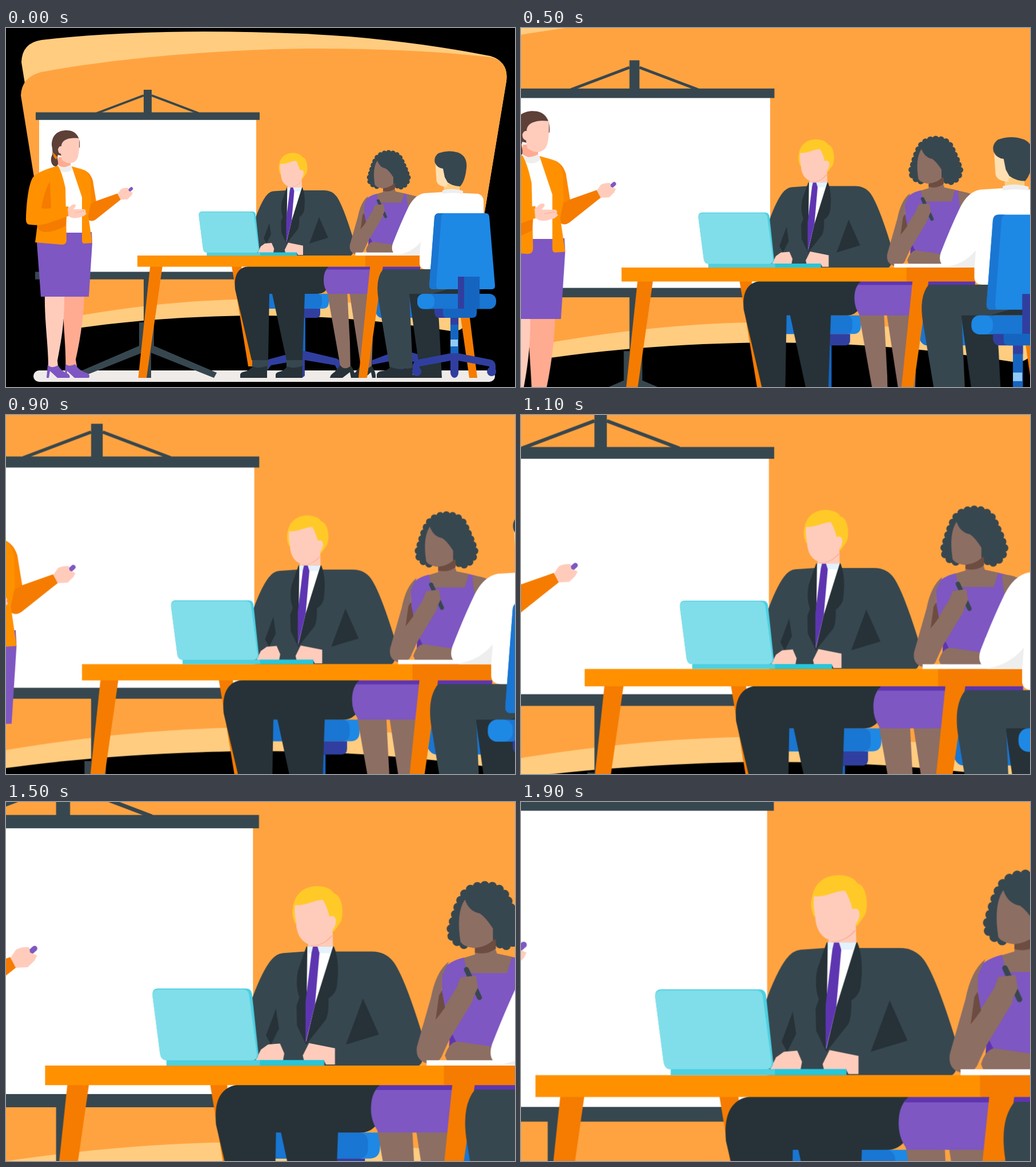
Write an HTML page that moves like this. It is 891 px wide and 628 px high and loops after 2 s.

```html
<!DOCTYPE html>
<html lang="en">
<head>
<meta charset="utf-8">
<title>Team presentation</title>
<style>
  html, body { margin: 0; width: 100%; height: 100%; overflow: hidden; background: #000; }
  svg { display: block; width: 100vw; height: 100vh; }
  #scene { transform-origin: 445.5px 314px; animation: zoom 2s steps(20, end) infinite; }
  @keyframes zoom { from { transform: scale(1); } to { transform: scale(2); } }

  .sand { fill: #ffcc80; } .amber { fill: #ffa340; }
  .slate { fill: #37474f; } .ink { fill: #263238; }
  .white { fill: #fff; } .grey { fill: #eeeeee; }
  .orange { fill: #ff9100; } .rust { fill: #f57c00; }
  .violet { fill: #7e57c2; } .grape { fill: #5e35b1; }
  .peach { fill: #ffccbc; } .coral { fill: #ffab91; }
  .brown { fill: #8d6e63; } .umber { fill: #6d4c41; }
  .cream { fill: #ffe0b2; }
  .sky { fill: #1e88e5; } .blue { fill: #1976d2; } .deep { fill: #1565c0; } .navy { fill: #303f9f; }
</style>
</head>
<body>
<svg viewBox="0 0 891 628" preserveAspectRatio="none">
<g id="scene">

  <g id="backdrop">
    <path class="sand" d="M27 60Q28 26 62 21C210 4 365 4 520 10C640 15 750 30 848 49Q880 59 876 93L806 513Q801 532 778 530C650 510 540 502 420 503C310 505 220 512 133 524Q104 525 99 505Z"/>
    <path class="amber" d="M26 118Q27 86 62 77C180 55 350 38 530 36C650 36 750 40 848 51Q880 59 876 91L810 492Q805 505 790 503C680 481 540 475 400 475C290 478 200 491 105 507Q90 507 86 490Z"/>
    <rect x="48" y="599" width="808" height="20" rx="10" fill="#efebe9"/>
  </g>

  <g id="screen" class="slate">
    <path d="M241 118L159 149M255 118L337 149" fill="none" stroke="#37474f" stroke-width="4"/>
    <rect x="241" y="108" width="14" height="42"/>
    <rect x="241" y="430" width="13" height="182"/>
    <path d="M233 515H259V556L369 603L364 612L246 565L128 612L124 603L233 556Z"/>
    <rect class="white" x="58" y="155" width="380" height="274"/>
    <rect x="52" y="147.500" width="392" height="13.300"/>
    <rect x="51" y="426.500" width="393" height="13.200"/>
  </g>

  <g id="presenter">
    <path class="coral" d="M100 465H137C136 505 130 545 122 580L125 598H104C106 560 99 520 100 465Z"/>
    <path class="peach" d="M68 465H102C103 515 96 550 90 582L92 600H74C75 560 67 515 68 465Z"/>
    <path class="violet" d="M104 587Q109 594 121 588Q128 600 143 604Q148 608 145 612H120L107 600L106 612H103Z"/>
    <path class="violet" d="M73 589Q80 597 91 590Q97 601 109 605Q113 609 111 612H90L77 600L75 612H71Z"/>
    <path class="violet" d="M56 357H150L151 376L145 470H61L54 376Z"/>
    <path class="white" d="M88 244L117 243L134 290V358H105Z"/>
    <path class="coral" d="M92 226H113V242Q101 248 89 238Z"/>
    <path class="grey" d="M87 240Q99 247 112 240L118 244Q113 253 102 252Q93 251 87 244Z"/>
    <path d="M80 205C80 187 91 179 106 179C123 179 131 192 129 209L99 224L91 222C88 230 95 238 88 242C80 243 77 231 80 224Q83 219 80 205Z" fill="#5d4037"/>
    <path class="rust" d="M82 217L90 226L88 230Q82 226 82 217Z"/>
    <path class="peach" d="M97 207C97 195 111 191 128 193Q129 214 126 225C122 239 108 239 98 231L96 220Q91 219 91 212Q93 206 97 207Z"/>
    <path d="M136 248Q148 253 152 267L158 304L151 337L143 330Z" fill="#fb8500"/>
    <path class="rust" d="M157 303L195 289.600L201 300L157 335Q150 340 143 335L147 309Z"/>
    <path class="orange" d="M115 242L133 247Q145 251 148 268L149 305L144 328L151 376L137 377Q133 377 133 371V296Z"/>
    <path class="orange" d="M91 241Q98 252 104 280L106 371Q106 379 98 379L51 375L55 344H42Q34 344 35 332C36 305 39 277 46 263Q53 251 91 241Z"/>
    <path class="rust" d="M77 268Q66 287 62 315L79 318Z"/>
    <path class="rust" d="M54 344L106 330L105 346Q82 358 66 357Q55 355 54 344Z"/>
    <path class="orange" d="M50 331L62 317L109 312L112 328L72 342Q55 346 43 344Z"/>
    <path class="peach" d="M108 316L116 309Q123 307 122 312L118 317L137 317Q141 319 139 322L141 325L136 329L126 332Q114 334 109 328Z"/>
    <path d="M122 323L137 320" stroke="#ffab91"/>
    <path d="M215 285L219.500 281" stroke="#7e57c2" stroke-width="5.500" stroke-linecap="round"/>
    <path class="peach" d="M195.500 290L201 282Q207 279 214 279.700L215 285L222 288L219.500 293L212.600 299.700L200.600 300.300Z"/>
  </g>

  <g id="rear-chairs">
    <path class="sky" d="M455 465H565V480Q565 491 554 491H455Z"/>
    <path class="blue" d="M455 465H543Q553 465 553 475V481Q553 491 543 491H455Z"/>
    <path class="navy" d="M519 491H550V500Q550 507 543 507H519Z"/>
    <rect class="deep" x="512" y="507" width="12" height="62"/>
    <path class="navy" d="M515 565H523L578 578Q586 580 586 590V598H580L576 590L523 581V608Q519 614 515 608V581L464 590L458 598H452V588Q452 582 462 579Z"/>
    <path class="blue" d="M645 465H740V507H658Q648 507 645 490Z"/>
    <path class="navy" d="M686 564H697L748 578V590L697 581V610H686V580L641 589V581Z"/>
  </g>

  <path id="rear-leg" class="rust" d="M395 416H412L434 592H424Z"/>

  <g id="suited-man">
    <path class="slate" d="M431 576H459V596H431ZM491 576H519V596H491Z"/>
    <path class="ink" d="M432 592Q443 597 457 591V612H410V606Q411 602 418 601Q426 599 432 592ZM492 592Q505 597 519 591V612H472V606Q473 602 480 601Q487 599 492 592Z"/>
    <path class="ink" d="M424 416H575L565 452Q558 465 546 465H523L519 581H491L466 465H461L459 581H430L401 457C399 436 404 419 424 417Z"/>
    <path class="slate" d="M468 285.500L490 284H557Q571 284 579 295Q590 311 607 366Q612 393 604 398H440L436 334Q446 306 455 294Q461 286 468 285.500Z"/>
    <path class="ink" d="M461 341L464 361L456 377L451 368ZM548 331L564 367L531 377Z"/>
    <path class="ink" d="M491.400 279H519Q525 294 522 318Q521 326 513.500 331Q514 345 511 352L491 377L482 358L481.500 338L484.500 330Q480 318 483 303Z"/>
    <path class="white" d="M492.400 279H518L500 337L491 375Z"/>
    <path fill="#e3f2fd" d="M492.400 279H518L515 285.500H493Z"/>
    <path class="grape" d="M498 279H502.500L504.500 285.500L500 337L490.500 376V335L496.500 285.500Z"/>
    <path d="M480 256Q476 246 478 240C480 225 490 218.500 503 218.500C512 219 517 222 519 226C528 228 529 247 526 254L519 264H510V245Z" fill="#ffca28"/>
    <path class="peach" d="M494 258H517.500L518 279H493Z"/>
    <path d="M496 278Q509 278 517 268" fill="none" stroke="#ffab91"/>
    <path class="peach" d="M480 237.500C490 239 500 232 508 232.500Q512 239 514.500 249Q521 247 521 254Q520 261 517 263C515 272 508 277 498 278Q482 275 481 255Q479 245 480 237.500Z"/>
  </g>

  <g id="dress-woman">
    <path class="brown" d="M561 455H597L602 550L603 596H586ZM600 455H645L640 598H622Z"/>
    <path class="ink" d="M585 590Q592 600 604 591Q612 602 610 612H604L602 602L589 612H567Q568 606 575 602ZM621 590Q630 600 640 591Q648 602 647 612H641L639 602L628 612H605Q606 606 612 602Z"/>
    <path class="violet" d="M566 417H725V465H564Q556 455 556 441Q556 424 566 417Z"/>
    <path class="grape" d="M565 417H725V422.400H561Z"/>
    <path class="brown" d="M660 281L660 287L640 293V312H710L730 309L719 295L696 289L682 286L680 280Z"/>
    <path class="violet" d="M627 303Q633 294 649 290L652 305.500H692L697 289.500L719 295L710 398H640L629 340Q626 322 627 303Z"/>
    <path class="brown" d="M701 292Q714 291 722 298L716 330H706Z"/>
    <path class="grape" d="M635 362L642 376L634 382ZM716 313L712 340L705 340Z"/>
    <path class="brown" d="M630 388Q634 375 642 374L674 378.500L680 380V393H632Z"/>
    <path class="brown" d="M634 294Q621 304 616 330L602 379Q600 392 611 395.500Q624 398 628 386L635 371L658 333L660 318L641 321L621 353L627 328V309Z"/>
    <path class="umber" d="M627 323L624 328L620.600 353L630 340Z"/>
    <path d="M651.500 302L664.500 330" stroke="#37474f" stroke-width="5" stroke-linecap="round"/>
    <path class="brown" d="M641 322L645.500 310L661 308L663 320L655 337Z"/>
    <path class="slate" stroke="#37474f" stroke-width="9" stroke-linecap="round" stroke-dasharray="0 7.500" d="M649 277Q635 273 636 262L642 242L647 230Q655 218 671 218Q687 219 692 231L700 249L704 261Q703 277 687 279L675 262L656 258Z"/>
    <path class="umber" d="M660 272H681V281Q672 288 660 285Z"/>
    <path class="brown" d="M650 232Q654 244 665 246Q671 250 678 261V273Q670 280 659 280.500Q648 279 645.500 274Q641 245 650 232Z"/>
  </g>

  <g id="table">
    <path class="rust" d="M252.400 416H274L246 612H231.500ZM637.500 416H660L632 612H617Z"/>
    <rect class="orange" x="230" y="398" width="400" height="19.600"/>
    <rect class="rust" x="629" y="398" width="108" height="19.600"/>
    <path class="rust" d="M795 500H811L825 612H811Z"/>
    <rect class="white" x="611.600" y="392.700" width="115" height="5.300"/>
  </g>

  <g id="laptop">
    <path class="peach" d="M441 392L446 382L453 377L465 376L469.300 386L468 393H441Z"/>
    <path class="peach" d="M494 375.500L520 380.700V397H511L509 393H489L487.800 388Z"/>
    <rect x="351.400" y="392.500" width="94" height="5.500" fill="#4dd0e1"/>
    <rect x="445" y="392.500" width="64.300" height="5.500" fill="#26c6da"/>
    <path d="M343 321H431Q436 321 437 326L443.500 387Q443 392.500 438 392.500H350Q346 392 345 386L337.500 328Q337 321 343 321Z" fill="#4dd0e1"/>
    <path d="M343 322H428Q433 322 434 327L442 387Q442 392.500 437 392.500H350Q346 392 345 386L337.500 328Q337.500 322 343 322Z" fill="#80deea"/>
  </g>

  <g id="shirt-man">
    <path class="ink" d="M704 455H800V465H752Q757 495 758 515L763 612H705L724 598Z"/>
    <path class="slate" d="M660 422H800L790 452L746 465H706L712 596H672L652 475Q646 439 660 422Z"/>
    <path class="ink" d="M673 593Q692 600 712 594V612H649V606Q650 601 658 600Q668 599 673 593Z"/>
    <path class="cream" d="M766 262H794V290H767Z"/>
    <path class="sand" d="M767 276L780 270L794 277L793 284H767Z"/>
    <path class="cream" d="M751.500 234H772V278Q755 277 753.500 267Z"/>
    <path class="slate" d="M751 236Q748 226 757 219Q776 212 794 219Q808 226 806 245Q804 267 795 277Q783 277 773 270L768 261L765 246Q755 245 751 236Z"/>
    <path class="white" d="M764 287L732 289Q715 292 704 314Q691 341 677 377Q672 393 685 398H724V413Q725 422 736 422H836V302Q835 292 826 290Z"/>
    <path class="grey" d="M686 397Q710 393 726 374L724 398ZM764 284Q780 279 800 285V290Q782 287 763 290Z"/>
  </g>

  <g id="front-chair">
    <rect class="blue" x="720" y="465" width="138" height="26.500" rx="12"/>
    <rect class="sky" x="720" y="465" width="30" height="26.500" rx="11"/>
    <path class="sky" d="M758 324H840Q845 324 846 330L856 451Q856 457 850 457H747Q741 457 741 450L750 331Q751 324 758 324Z"/>
    <path class="blue" d="M758 324H767Q763 325 762 331L753 450Q753 457 758 457H747Q741 457 741 450L750 331Q751 324 758 324Z"/>
    <path class="navy" d="M791 435H803V491H791ZM750 491H780V507H759Q751 507 750 498Z"/>
    <path class="deep" d="M802 435H829V491H824V499Q824 507 816 507H772Q765 507 765 499V491H802Z"/>
    <rect class="deep" x="778" y="507" width="14" height="64"/>
    <rect class="navy" x="778" y="507" width="14" height="12"/>
    <rect x="778" y="545" width="13" height="12" fill="#90caf9"/>
    <path class="navy" d="M778 569H792L848 580Q857 582 857 592V600H846V592L792 582V602H778V582L724 592V600H712V590Q713 583 722 580Z"/>
    <ellipse class="navy" cx="719" cy="601" rx="8" ry="8"/>
    <ellipse class="navy" cx="785" cy="603" rx="7" ry="9"/>
    <ellipse class="navy" cx="850" cy="601" rx="8" ry="8"/>
  </g>

</g>
</svg>
</body>
</html>
```
